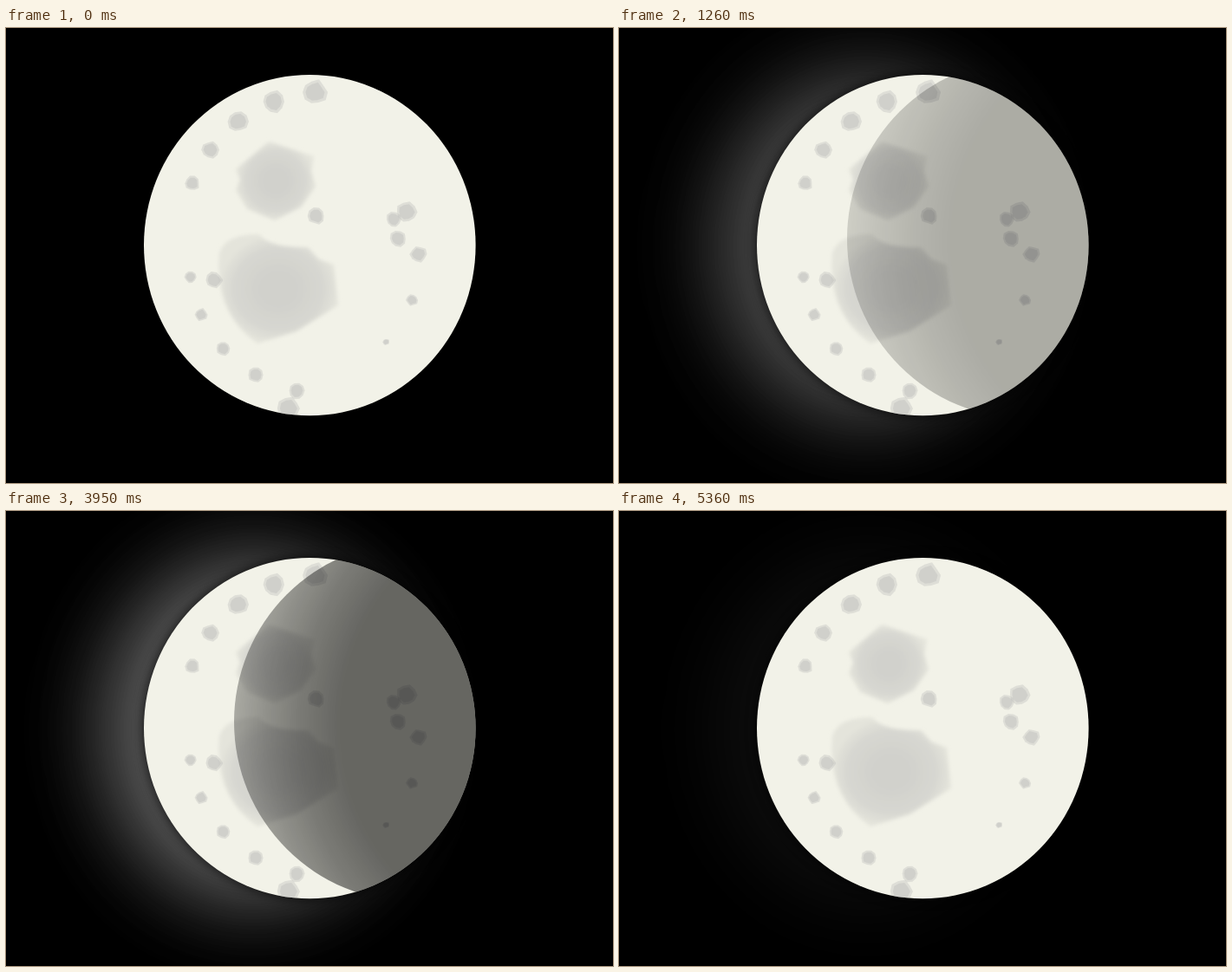
An HTML page for the animation above (5600 ms loop, 700 by 525 pixels).

```html
<!DOCTYPE html>
<html lang="en">
<head>
<meta charset="utf-8">
<title>Moon phase</title>
<style>
  html, body { margin: 0; width: 100%; height: 100%; overflow: hidden; background: #000; }
  svg { display: block; width: 100%; height: 100%; }
  .shade { opacity: 0; animation: shade 5600ms linear infinite; }
  .glow { opacity: 0; animation: glow 5600ms step-end infinite; }

  @keyframes shade {
    0% { opacity: 0; }
    16.0714% { opacity: 0; animation-timing-function: steps(9, end); }
    30.5357% { opacity: .653; }
    68.9286% { opacity: .653; animation-timing-function: steps(9, end); }
    83.3929%, 100% { opacity: 0; }
  }
  @keyframes glow {
    0% { opacity: 0; }
    6.4286% { opacity: .21; }
    12.3214% { opacity: .4; }
    17.6786% { opacity: .58; animation-timing-function: steps(8, end); }
    30.5357% { opacity: 1; }
    68.9286% { opacity: 1; animation-timing-function: steps(9, end); }
    83.3929% { opacity: .53; }
    89.8214% { opacity: .33; }
    95.7143%, 100% { opacity: .14; }
  }
</style>
</head>
<body>
<svg viewBox="0 0 700 525">
  <defs>
    <ellipse id="disc" cx="350.3" cy="250.6" rx="191.3" ry="196.6"/>
    <clipPath id="moonClip"><use href="#disc"/></clipPath>
    <filter id="halo" filterUnits="userSpaceOnUse" x="-100" y="-100" width="900" height="725">
      <feGaussianBlur stdDeviation="45"/>
    </filter>
    <filter id="rim" filterUnits="userSpaceOnUse" x="100" y="0" width="500" height="525">
      <feGaussianBlur stdDeviation="7"/>
    </filter>
    <filter id="soft"><feGaussianBlur stdDeviation="2"/></filter>
    <radialGradient id="mare">
      <stop offset=".3" stop-color="#d1d1cc"/>
      <stop offset=".75" stop-color="#d7d7d1"/>
      <stop offset="1" stop-color="#e4e4db"/>
    </radialGradient>
    <radialGradient id="dusk" gradientUnits="userSpaceOnUse" cx="645" cy="247" r="382">
      <stop offset=".68" stop-opacity="1"/>
      <stop offset=".8" stop-opacity=".86"/>
      <stop offset=".9" stop-opacity=".7"/>
      <stop offset="1" stop-opacity=".52"/>
    </radialGradient>
  </defs>

  <rect width="700" height="525"/>
  <g class="glow">
    <ellipse cx="285" cy="252" rx="177" ry="205" fill="#646463" filter="url(#halo)"/>
  </g>
  <use href="#disc" filter="url(#rim)" opacity=".85"/>
  <use href="#disc" fill="#f2f2e8"/>

  <g clip-path="url(#moonClip)">
    <g fill="url(#mare)" filter="url(#soft)">
      <path d="M303 131L355 148 352 165 357 183 340 207 310 222 278 209 265 187 270 175 265 163Z"/>
      <path d="M246 260Q252 238 292 238Q304 254 348 253L361 267 378 273 383 320 335 350 290 364Q240 330 246 260Z"/>
    </g>
    <g id="craters" fill="#b0b0b0"></g>
    <circle class="shade" cx="470.7" cy="243.2" r="207.7" fill="url(#dusk)"/>
  </g>
</svg>
<script>
  let seed = 7;
  const random = () => (seed = seed * 16807 % 2147483647) / 2147483647;
  const lerp = (a, b, t) => a + (b - a) * t;

  // An uneven round spot with a denser core.
  function crater(x, y, size) {
    const corners = 10;
    const points = Array.from({ length: corners }, (_, i) => {
      const angle = i / corners * 2 * Math.PI;
      const r = lerp(.82, 1.06, random());
      return `${r * Math.cos(angle)},${r * Math.sin(angle)}`;
    }).join(" ");
    return [1, .76].map(scale =>
      `<polygon points="${points}" opacity=".3"
        transform="translate(${x} ${y}) scale(${size * scale})"/>`).join("");
  }

  // Craters spaced evenly along a spiral arc around the middle of the moon.
  function arc({ from, step, count, radius, size }) {
    return Array.from({ length: count }, (_, i) => {
      const t = i / (count - 1);
      const angle = (from + step * i) * Math.PI / 180;
      const r = lerp(...radius, t);
      return crater(350 + r * Math.cos(angle), 251 + r * Math.sin(angle), lerp(...size, t));
    }).join("");
  }

  document.getElementById("craters").innerHTML = [
    arc({ from: 208, step: 16, count: 5, radius: [153, 177], size: [9, 15] }),
    arc({ from: 95, step: 17.5, count: 5, radius: [168, 142], size: [10, 7] }),
    arc({ from: -19, step: 23.5, count: 4, radius: [118, 142], size: [13, 4] }),
    crater(358, 217, 10),
    crater(452, 243, 10),
    crater(447, 221, 9),
    crater(240, 291, 10),
    crater(326, 439, 14)
  ].join("");
</script>
</body>
</html>
```
